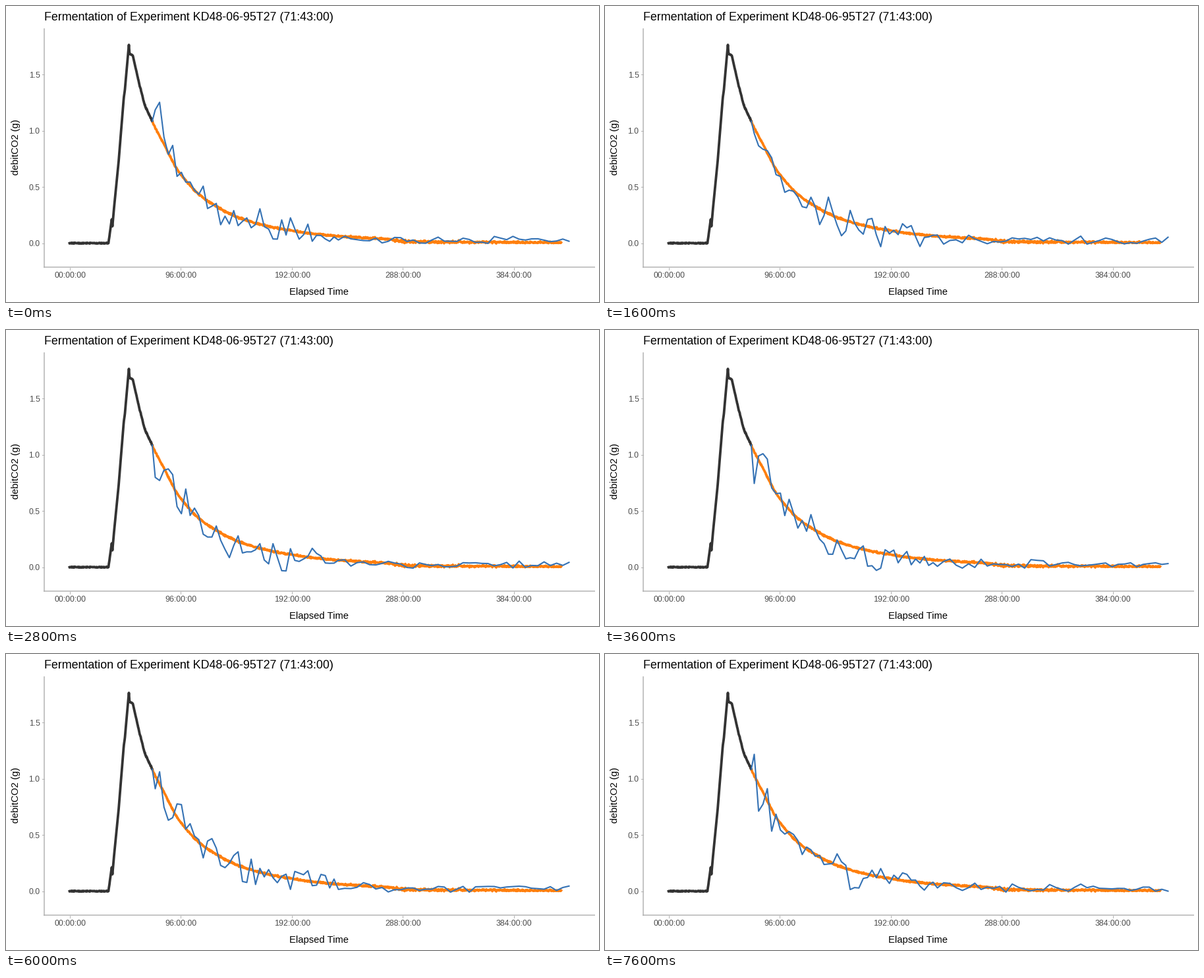
Write a matplotlib script that moves like this. It is 900 px wide and 450 px high and loops after 8000 ms.

```python
import numpy as np
import matplotlib.pyplot as plt
from matplotlib.animation import FuncAnimation

W, H, DPI = 900, 450, 100
FRAMES, INTERVAL = 20, 400
PT = 72 / DPI  # points per pixel
ZERO_Y = 360
GREY, TICK_TEXT = "#b3b3b3", "#4d4d4d"
BLACK, ORANGE, BLUE = "#333333", "#ff7f0e", "#3572b4"

plt.rcParams["font.family"] = "Liberation Sans"
fig = plt.figure(figsize=(W / DPI, H / DPI), dpi=DPI, facecolor="white")
ax = fig.add_axes([0, 0, 1, 1])
ax.set_xlim(-0.5, W - 0.5)
ax.set_ylim(H - 0.5, -0.5)
ax.axis("off")


def stroke(x, y, color, px, **kw):
    return ax.plot(x, y, color=color, lw=px * PT, solid_joinstyle="round",
                   **kw)[0]


def label(x, y, text, px, color="black", ha="center", **kw):
    ax.text(x, y, text, fontsize=px * PT, color=color, ha=ha,
            va="baseline", **kw)


def draw_axes():
    stroke([57, 57], [33, 397], GREY, 1.5, solid_capstyle="butt")
    stroke([56.5, 893], [396.5, 396.5], GREY, 1.5, solid_capstyle="butt")
    for i in range(5):
        x = 96.5 + 168.4 * i
        stroke([x, x], [397, 400], GREY, 1)
        label(x + 0.5, 412.5, f"{96 * i:02d}:00:00", 12.4, TICK_TEXT)
    for i in range(4):
        y = ZERO_Y - 85.4 * i
        stroke([54, 57], [y, y], GREY, 1)
        label(51, y + 4.5, f"{i / 2:.1f}", 12.3, TICK_TEXT, ha="right")
    label(57, 22, "Fermentation of Experiment KD48-06-95T27 (71:43:00)",
          17.9, ha="left")
    label(475, 439, "Elapsed Time", 14.8)
    label(19, 214, "debitCO2 (g)", 14.8, rotation=90, rotation_mode="anchor")


# Key points as (x, height above zero).
RISE = np.array([(96, 0), (155, 0), (160, 36), (161, 26), (163, 49),
                 (170, 119), (178, 218), (180, 234), (186, 302), (187, 288),
                 (192, 285), (202, 241), (210, 210), (221, 186)])
DECAY = np.array([(221, 186), (240, 149), (262, 108), (290, 76), (320, 55),
                  (360, 36), (400, 25), (460, 15), (580, 6), (620, 2),
                  (843, 1)])


def decay(x):
    """Piecewise exponential fall."""
    return ZERO_Y - np.exp(np.interp(x, DECAY[:, 0], np.log(DECAY[:, 1])))


def draw_measurements():
    rng = np.random.default_rng(5)
    x = np.arange(221, 842.5, 0.6)
    jitter = np.where((x > 588) & (x < 690), 1.0, 0.65)
    stroke(x, decay(x) + rng.normal(0, jitter), ORANGE, 3.7)
    x = np.union1d(np.arange(96, 221, 0.5), RISE[:, 0])
    jitter = np.where(x > 200, 0.8, 0.3)
    stroke(x, ZERO_Y - np.interp(x, *RISE.T) + rng.normal(0, jitter),
           BLACK, 3.8)


# Forecast knots: dense up to x=504, then wider apart.
KNOTS = np.concatenate([[221.5], np.linspace(226, 504, 43),
                        np.linspace(504, 854, 38)[1:]])
BIAS = np.interp(KNOTS, [232, 242], [18, 3])
SPREAD = np.interp(KNOTS, [226, 233, 240, 265, 285, 340, 400, 450, 520, 854],
                   [28, 38, 15, 16, 9, 14, 13, 10, 4, 2.5])


def forecast(step):
    step = max(step, 1)  # the first forecast stays for two steps
    rng = np.random.default_rng(300 + step)
    noise = np.clip(rng.normal(size=KNOTS.size), -2, 2)
    y = np.minimum(decay(KNOTS) + BIAS, 355.5) + SPREAD * noise
    y = np.clip(y, 94, np.where(KNOTS < 505, 368, 361.5))
    y[0] = 174.5
    return y


draw_axes()
draw_measurements()
line = stroke(KNOTS, forecast(0), BLUE, 2.1)


def update(step):
    line.set_ydata(forecast(step))
    return (line,)


anim = FuncAnimation(fig, update, frames=FRAMES, interval=INTERVAL,
                     repeat=True, repeat_delay=0)
plt.show()
```
